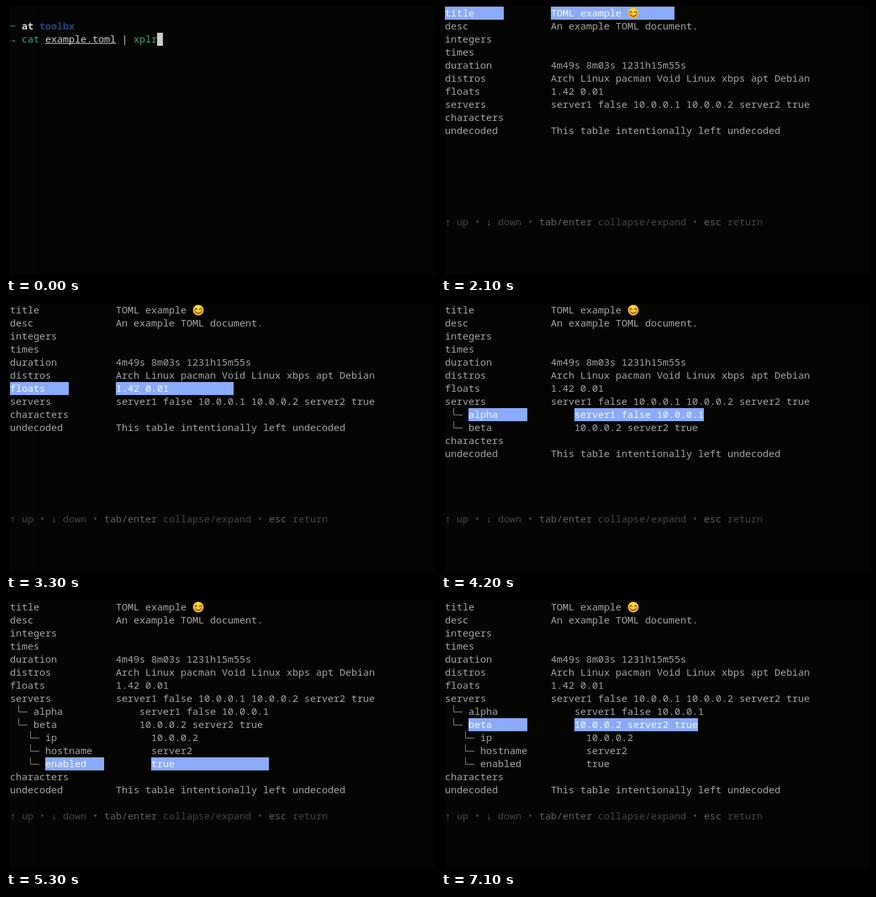
Animation of 656 by 412 pixels, one loop 7300 ms. Source, as an HTML page:

```html
<!DOCTYPE html>
<html lang="en">
<head>
<meta charset="utf-8">
<title>TOML tree viewer in a terminal</title>
<style>
  html, body { margin: 0; width: 100%; height: 100%; overflow: hidden; background: #000; }
  svg { display: block; width: 656px; height: 412px; }
  text {
    font: 15px "Noto Sans Mono", "DejaVu Sans Mono", "Liberation Mono", monospace;
    font-variant-ligatures: none;
    white-space: pre;
  }
  .bold { font-weight: 700; }
  rect { shape-rendering: crispEdges; }
</style>
</head>
<body>
<svg id="screen" viewBox="0 0 656 412">
  <defs>
    <radialGradient id="face" cx=".5" cy=".4" r=".6">
      <stop offset="0" stop-color="#ffe04a"/>
      <stop offset=".65" stop-color="#fcc934"/>
      <stop offset="1" stop-color="#ee9d1c"/>
    </radialGradient>
    <g id="smile">
      <circle r="8.3" fill="url(#face)"/>
      <circle cx="-5.2" cy="1.4" r="2" fill="#f4803a" opacity=".7"/>
      <circle cx="5.2" cy="1.4" r="2" fill="#f4803a" opacity=".7"/>
      <path d="M-5.2-1q1.7-3.2 3.4 0M1.8-1q1.7-3.2 3.4 0M-3.8 3q3.8 3.6 7.6 0"
            fill="none" stroke="#5f3a14" stroke-width="1.3" stroke-linecap="round"/>
    </g>
  </defs>
  <rect x="6" width="650" height="412" fill="#040403"/>
  <rect x="6" width="42" height="412" fill="#050505"/>
  <g id="view"></g>
</svg>
<script>
const LOOP = 7300;
const CELL = 9, LINE = 20, LEFT = 6, TOP = 1;
const TEXT = '#a6a6a6', LIT = '#8aabf9', KEY = '#626262', HINT = '#464646';

// depth, key, value
const ROWS = [
  [0, 'title', 'TOML example'],
  [0, 'desc', 'An example TOML document.'],
  [0, 'integers', ''],
  [0, 'times', ''],
  [0, 'duration', '4m49s 8m03s 1231h15m55s'],
  [0, 'distros', 'Arch Linux pacman Void Linux xbps apt Debian'],
  [0, 'floats', '1.42 0.01'],
  [0, 'servers', 'server1 false 10.0.0.1 10.0.0.2 server2 true'],
  [1, 'alpha', 'server1 false 10.0.0.1'],
  [1, 'beta', '10.0.0.2 server2 true'],
  [2, 'ip', '10.0.0.2'],
  [2, 'hostname', 'server2'],
  [2, 'enabled', 'true'],
  [0, 'characters', ''],
  [0, 'undecoded', 'This table intentionally left undecoded']
];

// column, text, colour
const HELP = [
  [0, '↑', KEY], [2, 'up', HINT], [5, '•', HINT],
  [7, '↓', KEY], [9, 'down', HINT], [14, '•', HINT],
  [16, 'tab/enter', KEY], [26, 'collapse/expand', HINT], [42, '•', HINT],
  [44, 'esc', KEY], [48, 'return', HINT]
];

// start time, drawing function, arguments
const STEPS = [
  [0, prompt, true],
  [400, prompt, false],
  [1000, prompt, true],
  [1400, tree, 'title', 0],
  [2200, tree, 'desc', 0],
  [2300, tree, 'integers', 0],
  [2500, tree, 'times', 0],
  [2600, tree, 'duration', 0],
  [2800, tree, 'distros', 0],
  [3200, tree, 'floats', 0],
  [3500, tree, 'servers', 0],
  [3800, tree, 'servers', 1],
  [4200, tree, 'alpha', 1],
  [4300, tree, 'beta', 1],
  [4600, tree, 'beta', 2],
  [4800, tree, 'ip', 2],
  [5100, tree, 'hostname', 2],
  [5200, tree, 'enabled', 2],
  [5400, tree, 'hostname', 2],
  [5600, tree, 'ip', 2],
  [5800, tree, 'beta', 2]
];

const px = col => LEFT + col * CELL;
const py = row => TOP + row * LINE;

function write(col, row, str, fill, cls = '') {
  return `<text x="${px(col)}" y="${py(row) + 15}" fill="${fill}" class="${cls}">${str}</text>`;
}

function block(col, row, cells, fill) {
  return `<rect x="${px(col)}" y="${py(row)}" width="${cells * CELL}" height="${LINE}" fill="${fill}"/>`;
}

function branch(col, row) {
  return `<path d="M${px(col) + 4.5} ${py(row)}v10.5H${px(col + 2)}" fill="none" stroke="#929292"/>`;
}

function prompt(cursor) {
  return write(0, 1, '~', '#3b8a78', 'bold') +
    write(2, 1, 'at', '#dadada', 'bold') +
    write(5, 1, 'toolbx', '#23457f', 'bold') +
    write(0, 2, '→', '#46a571', 'bold') +
    write(2, 2, 'cat', '#46a571') +
    write(6, 2, 'example.toml', '#cfcfcf') +
    `<rect x="${px(6)}" y="57" width="${12 * CELL}" height="1" fill="#cfcfcf"/>` +
    write(19, 2, '|', '#cfcfcf') +
    write(21, 2, 'xplr', '#46a571') +
    (cursor ? block(25, 2, 1, '#cccccc') : '');
}

function tree(selected, open) {
  const shown = ROWS.filter(([depth]) => depth <= open);
  const lines = shown.map(([depth, key, value], row) => {
    const indent = depth ? 2 + depth * 2 : 0;
    const col = indent + 18;
    const face = key === 'title';
    const lit = key === selected;
    const fill = lit ? '#f6f8ff' : TEXT;
    let out = depth ? branch(indent - 3, row) : '';
    if (lit) {
      out += block(indent, row, 10, LIT) +
        block(col, row, Math.max(20, value.length) + (face ? 1 : 0), LIT);
    }
    out += write(indent, row, key, fill) + write(col, row, value, fill);
    if (face) out += `<use href="#smile" x="${px(col + 14)}" y="${py(row) + 10}"/>`;
    return out;
  });
  return lines.join('') + HELP.map(([col, str, fill]) => write(col, 16, str, fill)).join('');
}

const view = document.getElementById('view');
const start = performance.now();
let current;

function tick() {
  const t = (performance.now() - start) % LOOP;
  const step = STEPS.filter(s => s[0] <= t).pop();
  if (step !== current) {
    current = step;
    const [, draw, ...args] = step;
    view.innerHTML = draw(...args);
  }
  requestAnimationFrame(tick);
}
tick();
</script>
</body>
</html>
```
